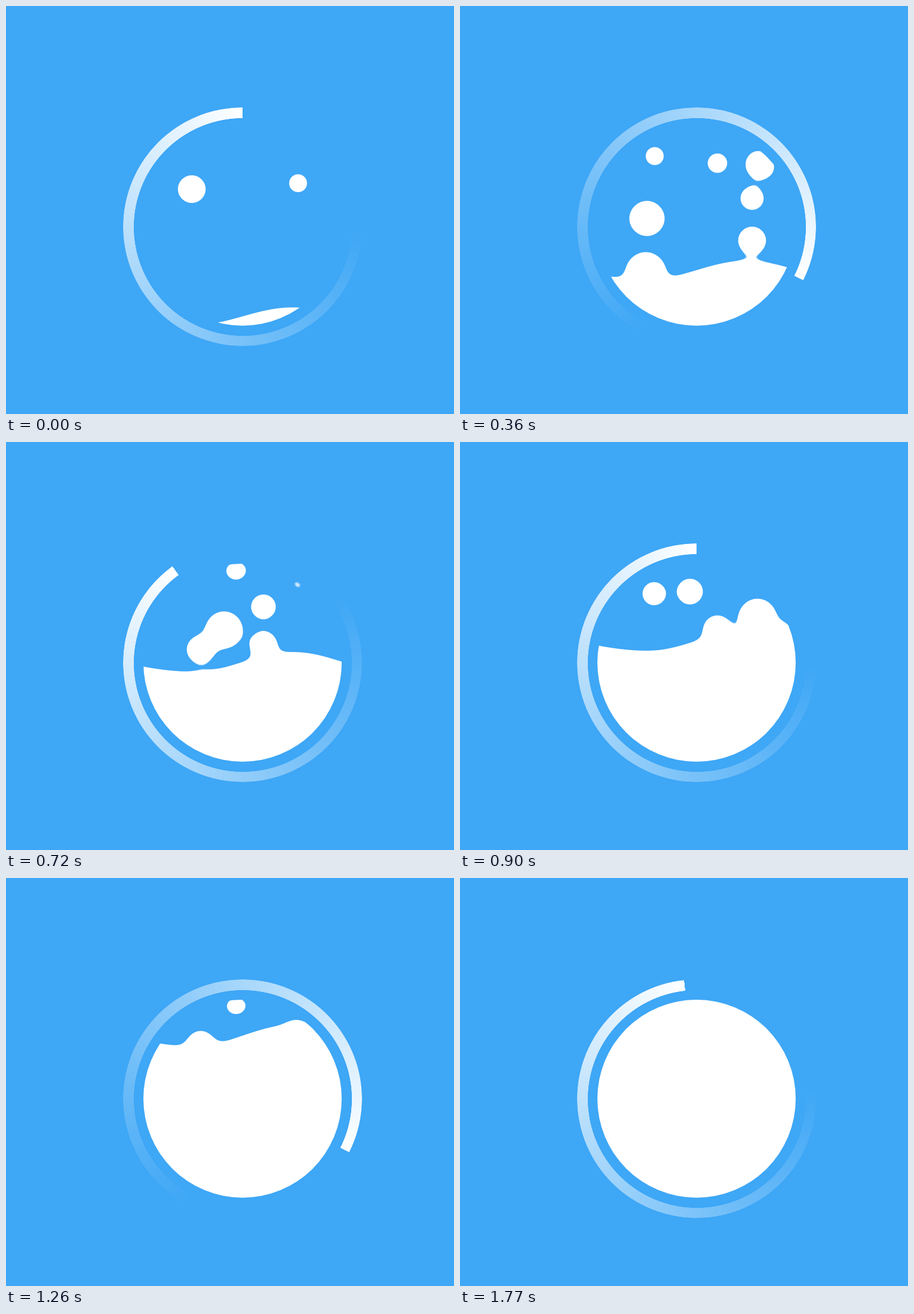
An HTML page that plays this animation: 750x684 px, repeating every 1800 ms.

```html
<!DOCTYPE html>
<html lang="en">
<head>
<meta charset="utf-8">
<title>Filling loader</title>
<style>
  html, body { margin: 0; width: 100%; height: 100%; overflow: hidden; background: #3ea7f6; }
  svg { position: absolute; left: 0; top: 0; display: block; }
  #track, #ring { width: 400px; height: 400px; border-radius: 50%; }
  #track {
    position: absolute; left: 196px; top: 170px;
    --hole: radial-gradient(circle at 200.5px 200.5px, transparent 182.2px, #000 182.8px);
    -webkit-mask: var(--hole);
    mask: var(--hole);
  }
  #ring { background: conic-gradient(rgba(255,255,255,0) 90deg, rgba(255,255,255,.3) 180deg, #fff 360deg); }
</style>
</head>
<body>
<div id="track"><div id="ring"></div></div>
<svg width="750" height="684" viewBox="0 0 750 684">
  <defs>
    <clipPath id="bowl"><circle cx="396" cy="370" r="166"/></clipPath>
    <filter id="goo" filterUnits="userSpaceOnUse" x="150" y="140" width="492" height="480">
      <feGaussianBlur stdDeviation="11"/>
      <feColorMatrix values="0 0 0 0 1  0 0 0 0 1  0 0 0 0 1  0 0 0 30 -10.3"/>
    </filter>
  </defs>
  <g clip-path="url(#bowl)">
    <g filter="url(#goo)" fill="#fff">
      <g id="drops" clip-path="url(#bowl)"></g>
      <path id="liquid"/>
    </g>
  </g>
</svg>
<script>
const STEP = 30, STEPS = 60, TURN_STEPS = 30;

// Each stream lets one drop pass the height MARK every `gap` ms, from `first` on.
// Later drops are larger by `grow`; `xs` gives their columns.
const MARK = 300;
const STREAMS = [
  { speed: .3875, first: -18, gap: 233, size: 21.5, grow: 2.2, xs: [311, 313, 503, 365, 498, 505] },
  { speed: .267, first: 11, gap: 265, size: 15.5, grow: 1.6, xs: [489, 489, 326, 541, 325, 326, 385] },
  { speed: .2125, first: 532, gap: 300, size: 18.8, grow: 2.6, xs: [431, 431, 385, 486] }
];

const ring = document.getElementById('ring');
const liquid = document.getElementById('liquid');
const group = document.getElementById('drops');

const drops = STREAMS.flatMap(({ speed, first, gap, size, grow, xs }) => xs.map((x, i) => {
  const el = group.appendChild(document.createElementNS('http://www.w3.org/2000/svg', 'circle'));
  el.setAttribute('cx', x);
  return { el, speed, pass: first + gap * i, size: size + grow * i };
}));

function smooth(from, to, s) {
  const u = Math.min(1, Math.max(0, (s - from) / (to - from)));
  return u * u * (3 - 2 * u);
}

// Half of each turn is steady, the other half is an eased push
const angle = s => 180 * s / TURN_STEPS + 180 * smooth(6.7, 23, s);

// A long swell on the left, a shorter one on the right
function waveY(x, mean, amp) {
  return x < 315
    ? mean + amp * Math.cos(Math.PI * (x - 315) / 250)
    : mean - amp * Math.sin(Math.PI * (x - 397.5) / 165);
}

function draw(step) {
  const t = step * STEP;
  ring.style.transform = `rotate(${angle(step % TURN_STEPS)}deg)`;

  const mean = 524 - 6.6 * step + .012 * step * step;
  const amp = 15 + .075 * step;
  let d = 'M160 610';
  for (let x = 160; x <= 632; x += 4) d += `L${x} ${waveY(x, mean, amp).toFixed(2)}`;
  liquid.setAttribute('d', d + 'L632 610Z');

  for (const { el, speed, pass, size } of drops) {
    const fall = speed * (t - pass);
    el.setAttribute('cy', MARK + fall);
    el.setAttribute('r', Math.max(0, size + .07 * fall));
  }
}

const start = performance.now();
let shown = -1;
function tick() {
  const step = Math.floor((performance.now() - start) / STEP) % STEPS;
  if (step !== shown) draw(shown = step);
  requestAnimationFrame(tick);
}
tick();
</script>
</body>
</html>
```
